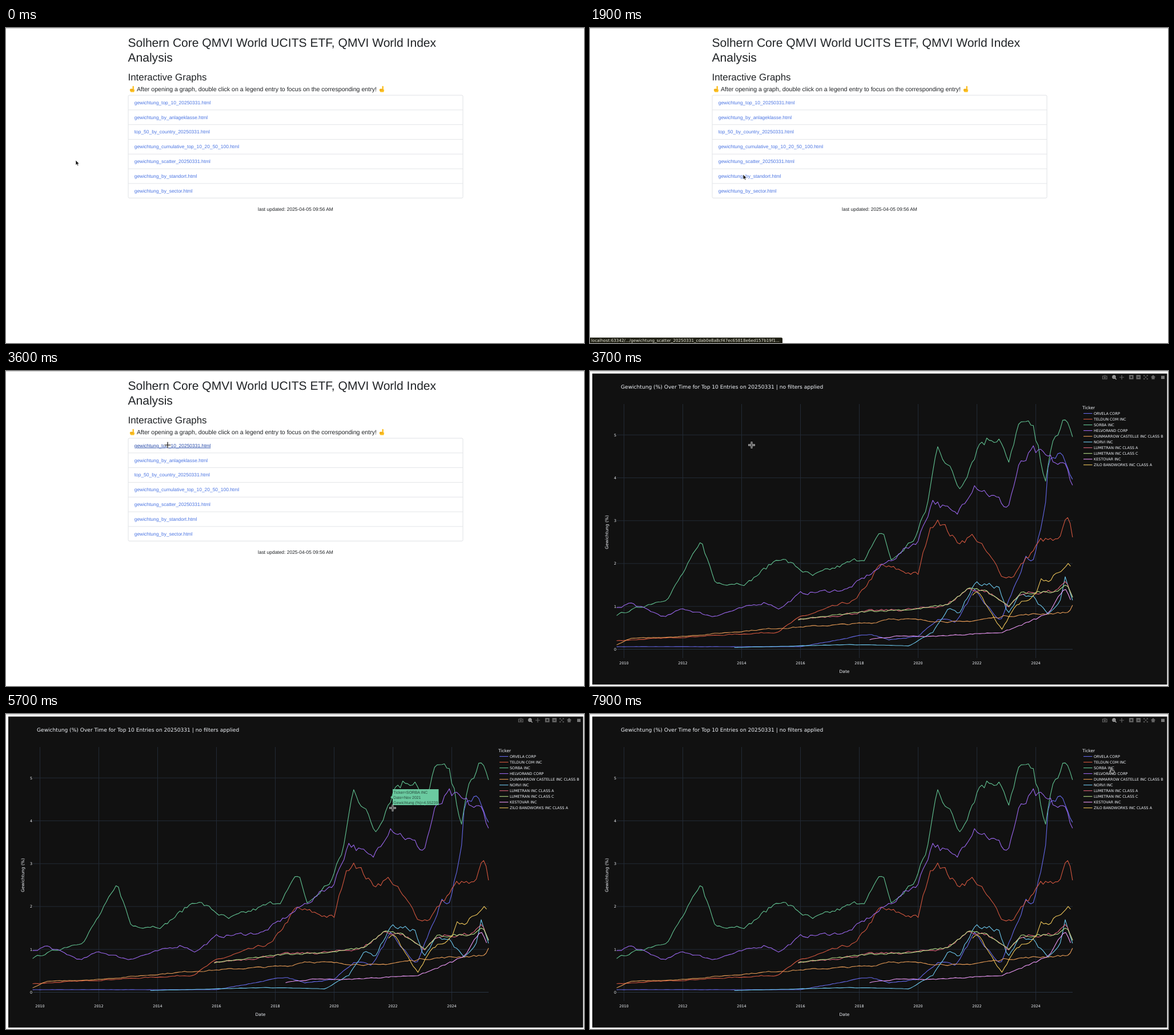
These frames come from a looping animation (1012x553 px, 8000 ms). An HTML page:

```html
<!DOCTYPE html>
<html lang="en">
<head>
<meta charset="utf-8">
<title>Interactive graphs</title>
<style>
  html, body { margin: 0; width: 100%; height: 100%; overflow: hidden; background: #fff; }
  svg { display: block; text-rendering: geometricPrecision; }
  #page, #tip { font-family: "Liberation Sans", Arial, sans-serif; fill: #202326; }
  #chart, #status { font-family: "DejaVu Sans", Verdana, sans-serif; }
  #chart { font-size: 6.45px; fill: #f2f5fa; }
  .link { font-size: 8.45px; fill: #4a74e2; }
  .link.on { fill: #2549a8; text-decoration: underline; }
  .line { fill: none; stroke-width: 1.1; stroke-linejoin: round; }
  .icon { fill: none; stroke: #646464; stroke-width: 1.2; }
</style>
</head>
<body>
<svg width="1012" height="553" viewBox="0 0 1012 553">
  <defs>
    <g id="finger">
      <path d="M6 6V1.5q1.2-1.5 2.4 0V6.5l1.3 1.2-.9 3.8H3L1.4 9V6.6q2.2-1.6 4.6-.6z" fill="#fcc021"/>
      <path d="M3 6.5v2.2M4.6 6.3v2.4M6.2 6.3v2.2" fill="none" stroke="#d98d1c" stroke-width=".7"/>
    </g>
  </defs>

  <path d="M0 .5H1012" stroke="#c9c9c9"/>

  <g id="page">
    <g font-size="21.05">
      <text x="213.5" y="33">Solhern Core QMVI World UCITS ETF, QMVI World Index</text>
      <text x="213.5" y="58.5">Analysis</text>
    </g>
    <text x="213.5" y="92" font-size="16.9">Interactive Graphs</text>
    <use href="#finger" x="215.5" y="101"/>
    <text x="229" y="110.6" font-size="10.6">After opening a graph, double click on a legend entry to focus on the corresponding entry!</text>
    <use href="#finger" x="652.5" y="101"/>
    <g id="list"><rect x="214" y="118" width="586" height="180.5" rx="2" fill="none" stroke="#dfe2e5"/></g>
    <text x="507" y="321" font-size="8.45" text-anchor="middle">last updated: 2025-04-05 09:56 AM</text>
  </g>

  <g id="status">
    <path d="M0 553V543.5H335q2 0 2 2V553z" fill="#1e1e13"/>
    <text x="2" y="551" font-size="7.2" fill="#ecebdd"></text>
  </g>

  <g id="chart">
    <rect x="4" y="4.5" width="1006.5" height="546" fill="#111"/>
    <g id="grid"></g>
    <text x="54" y="31" font-size="9.1">Gewichtung (%) Over Time for Top 10 Entries on 20250331 | no filters applied</text>
    <text x="445.5" y="529.5" font-size="7.45" text-anchor="middle">Date</text>
    <text transform="translate(31.5 283) rotate(-90)" font-size="7.45" text-anchor="middle">Gewichtung (%)</text>
    <text x="862" y="66.8" font-size="7.45">Ticker</text>
    <g class="icon">
      <path d="M897.5 9H899.5L900.3 8H902.5L903.3 9H905V14H897.5z"/><circle cx="901.3" cy="11.4" r="1.2"/>
      <path d="M931 7V15M927 11H935"/>
      <path d="M944.5 7.5h6.5v6.5h-6.5zM957 7.5h6.5v6.5H957z" fill="#646464"/>
      <path d="M947.7 9v3.6M946 10.8h3.6M958.5 10.8h3.6" stroke="#111"/>
      <path d="M970 8l6 6M976 8l-6 6M969.5 9.5v-2h2M976.5 9.5v-2h-2M969.5 12.5v2h2M976.5 12.5v2h-2" stroke-width=".8"/>
      <path d="M982.5 11L986 7.8L989.5 11M984 11V14H988V11" fill="#646464"/>
      <g stroke="#c8c8c8"><circle cx="917.3" cy="10.4" r="2.5"/><path d="M919.3 12.4L921.5 14.8M916 10.4h2.6M917.3 9.1v2.6"/></g>
    </g>
    <rect x="1000" y="8.5" width="6" height="5.5" fill="#777"/>
    <g id="lines"></g>
    <g id="tip" font-size="6.9">
      <path d="M673 146L677 143V132H757.5V160H677V149z" fill="#6bcaa0"/>
      <g fill="#27493b">
        <text x="678.3" y="139.8">Ticker=SORBA INC</text>
        <text x="678.3" y="148.8">Date=Nov 2021</text>
        <text x="678.3" y="157.8">Gewichtung (%)=4.55239</text>
      </g>
    </g>
  </g>

  <g id="cursor">
    <path id="arrow" d="M0 0V8.8L2 7L3.4 10L5 9.3L3.6 6.4H6.3z" fill="#151515" stroke="#fff" stroke-width=".7"/>
    <g id="cross" fill="none">
      <path d="M0-5.8V5.8M-5.8 0H5.8" stroke="#e4e4e4" stroke-width="2.8"/>
      <path d="M0-5.2V5.2M-5.2 0H5.2" stroke="#1c1c1c" stroke-width="1.2"/>
    </g>
    <path id="hand" d="M-1.5 3V-2.5q1-1.4 2 0V.4l4 .9q1 .4 .7 1.6L4.3 6H-.4L-3.6 2.2q.7-1.1 2.1.8z" fill="#2a2a2a" stroke="#d4d4d4" stroke-width=".9"/>
  </g>
</svg>

<script>
const $ = id => document.getElementById(id);

function add(parent, tag, attrs, text = '') {
  const node = document.createElementNS('http://www.w3.org/2000/svg', tag);
  for (const key in attrs) node.setAttribute(key, attrs[key]);
  node.textContent = text;
  return $(parent).appendChild(node);
}

// Values between [position, ...values] keys, in a straight line
function between(keys, t) {
  const i = keys.findIndex(key => key[0] >= t);
  if (i < 1) return keys.at(i).slice(1);
  const [a, b] = [keys[i - 1], keys[i]];
  const k = (t - a[0]) / (b[0] - a[0]);
  return a.slice(1).map((v, n) => v + (b[n + 1] - v) * k);
}

const parseKeys = text => text.split(' ').map(key => key.split(':').map(Number));

// Link list
const ROW = 25.83;
const files = ['gewichtung_top_10_20250331', 'gewichtung_by_anlageklasse', 'top_50_by_country_20250331',
  'gewichtung_cumulative_top_10_20_50_100', 'gewichtung_scatter_20250331', 'gewichtung_by_standort', 'gewichtung_by_sector'];
const links = files.map((file, i) => {
  if (i) add('list', 'path', { d: `M214 ${118 + i * ROW}h586`, stroke: '#e3e5e8' });
  return add('list', 'text', { x: 224.7, y: 133.7 + i * ROW, class: 'link' }, file + '.html');
});

// Axes
const yearX = year => 59.5 + (year - 2010) * 51.5;
const valueY = value => 488.5 - value * 75.25;
for (let year = 2010; year < 2025; year += 2) {
  const x = yearX(year);
  add('grid', 'path', { d: `M${x} 58V504`, stroke: '#222a35' });
  add('grid', 'text', { x, y: 515.3, 'text-anchor': 'middle' }, year);
}
for (let value = 0; value < 6; value++) {
  const y = valueY(value);
  add('grid', 'path', { d: `M47 ${y}H845`, stroke: value ? '#222a35' : '#283442' });
  add('grid', 'text', { x: 46, y: y + 2.4, 'text-anchor': 'end' }, value);
}

let seed = 7;
const random = () => (seed = seed * 16807 % 2147483647) / 2147483647;

// Monthly curve: a trend through year:value keys plus a small seeded drift
let entries = 0;
function series(name, stroke, rough, trend) {
  const keys = parseKeys(trend), points = [];
  let drift = 0;
  for (let year = keys[0][0]; year < 2025.26; year += 1 / 12) {
    drift = drift * .5 + (random() - .5) * rough;
    points.push([yearX(year), valueY(between(keys, year)[0] * (1 + drift))]);
  }
  const y = 74.5 + 10.03 * entries++;
  add('lines', 'polyline', { points: points.join(' '), stroke, class: 'line' });
  add('lines', 'path', { d: `M864 ${y}h15.5`, stroke, class: 'line' });
  add('lines', 'text', { x: 882, y: y + 2.5 }, name);
}
const twin = '2015.92:.69 2018.4:.89 2020:.94 2021:1.04 2021.7:1.41 2022.3:1.36 2023.1:1 2023.5:1.3 2024.7:1.36 2025.05:1.54 2025.25:1.22';
series('ORVELA CORP', '#6468e8', .06, '2009.75:.06 2016:.06 2018.4:.36 2019:.22 2020:.3 2020.7:.72 2021.3:.65 2021.9:1.35 2022.8:.65 2023.65:2.1 2023.9:1.95 2024.33:3.4 2024.42:4.2 2024.83:4.7 2025.25:3.9');
series('TELDUN COM INC', '#d5573f', .06, '2009.75:.2 2013:.32 2015.2:.4 2016:.75 2017.9:1.15 2018.7:1.95 2020:1.74 2020.35:2.7 2020.65:3.1 2021.3:2.5 2021.9:2.65 2022.9:1.7 2023.2:1.7 2024.2:2.55 2024.8:2.5 2025.1:3.1 2025.25:2.65');
series('SORBA INC', '#62c493', .05, '2009.75:.8 2011.5:1.2 2012.65:2.5 2013.1:1.55 2014.2:1.55 2015.3:2.15 2016.4:1.7 2018.2:2.15 2018.8:2.75 2019.1:2.05 2019.9:2.6 2020.3:3.3 2020.67:4.8 2021.4:3.75 2022.1:4.85 2022.8:5 2023.08:4.3 2023.5:5.35 2023.9:5.1 2024.33:4 2024.6:4.8 2025:5.4 2025.25:4.9');
series('HELVORAND CORP', '#9a66ee', .05, '2009.75:.95 2010.2:1.08 2011.4:.75 2012:.95 2013:.77 2014.8:1.1 2015.3:.95 2016:1.3 2017.6:1.4 2019:2.05 2020:2.55 2020.5:3.5 2021.3:3.1 2021.9:3.9 2023.05:3.3 2023.4:4.2 2023.9:4.6 2025:4.25 2025.25:3.9');
series('DUNMARROW CASTELLE INC CLASS B', '#e89c56', .05, '2009.75:.1 2010.2:.25 2012:.3 2015:.48 2018.5:.62 2019:.72 2021.5:.63 2023:.78 2025.1:.86 2025.25:1.02');
series('NORVI INC', '#6cc8ee', .07, '2013.75:.04 2017.7:.11 2019.7:.08 2020.5:.4 2021:.95 2021.4:.85 2021.92:1.55 2022.75:1.45 2023.05:.8 2023.5:1.3 2023.9:1.25 2024.4:.8 2024.8:1.05 2025:1.63 2025.25:1.1');
series('LUMETRAN INC CLASS A', '#e0677e', .06, twin);
series('LUMETRAN INC CLASS C', '#b5de87', .04, twin);
series('KESTOVAR INC', '#ee99f8', .06, '2018.35:.23 2019.4:.31 2020.5:.3 2022.9:.4 2024:.7 2024.5:.87 2025:1.45 2025.25:1.1');
series('ZILO BANDWORKS INC CLASS A', '#f0c75a', .06, '2021.85:1.3 2022.05:1.3 2022.85:.45 2023.3:1 2024:1.3 2024.2:1.65 2024.4:1.58 2025.1:2.05 2025.25:1.85');

// Pointer, as time:x:y keys
const route = parseKeys('0:122:232 900:214:238 1800:266:235 1900:268:257 2000:270:260 3000:283:130 4200:283:130 '
  + '5100:640:190 5400:677:165 5700:677:165 6500:680:264 7300:775:215 7900:913:98');
const pointer = t => between(route, t);

function hovered(t) {
  if (t < 1000) return -1;
  const rows = (pointer(t)[1] - 131) / ROW, row = Math.round(rows);
  return Math.abs(rows - row) < .11 ? row : -1;
}

const hash = 'cdab0e8a8cf47ec65818e6ed157b19f1';
const address = row => `localhost:63342/.../${files[row]}_${hash}${hash}`.slice(0, 80) + '...';

const show = (id, on) => $(id).style.display = on ? '' : 'none';
const statusText = $('status').querySelector('text');

function draw(now) {
  const t = Math.floor(now % 8000 / 100) * 100;
  const [x, y] = pointer(t);
  const charting = t >= 3700;
  const row = charting ? -1 : hovered(t);

  // The status bar keeps the latest hovered link
  let last = -1;
  for (let s = t; s >= 1000 && last < 0 && t < 3400; s -= 100) last = hovered(s);
  if (last >= 0) statusText.textContent = address(last);

  links.forEach((link, i) => link.classList.toggle('on', i === row));
  show('status', last >= 0);
  show('page', !charting);
  show('chart', charting);
  show('tip', t >= 5400 && t <= 5700);

  const kind = t < 3400 ? (row < 0 ? 'arrow' : 'hand') : x > 862 ? 'hand' : 'cross';
  for (const id of ['arrow', 'cross', 'hand']) show(id, id === kind);
  $('cursor').setAttribute('transform', `translate(${x} ${y})`);
  requestAnimationFrame(draw);
}
draw(performance.now());
</script>
</body>
</html>
```
